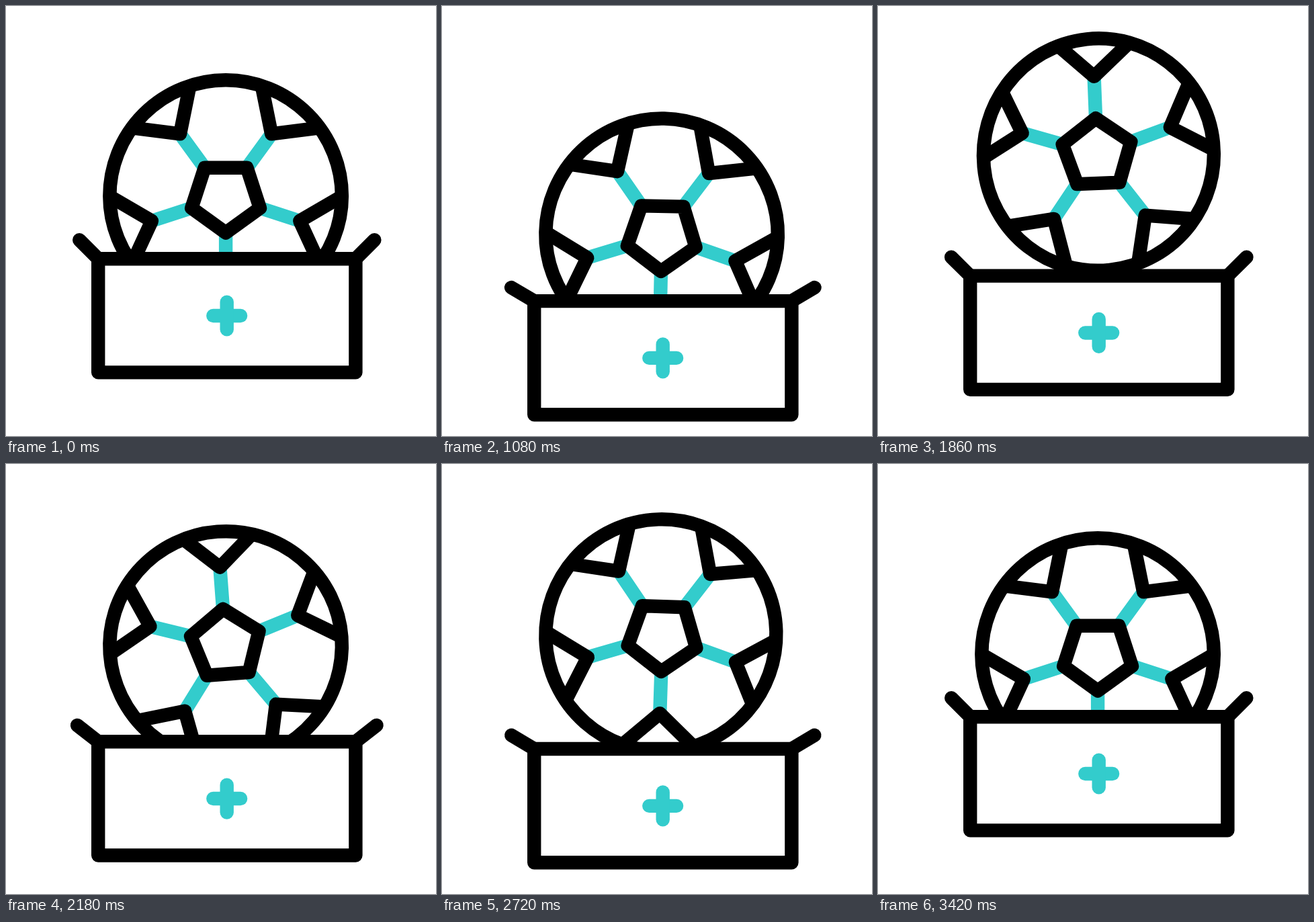
An HTML page with a canvas that plays this animation: 640 px wide and 640 px high, repeating every 3.62 s.

```html
<!DOCTYPE html>
<html lang="en">
<head>
<meta charset="utf-8">
<title>Ball in a box</title>
<style>
  html, body { margin: 0; width: 100%; height: 100%; overflow: hidden; background: #fff; }
  canvas { display: block; width: 640px; height: 640px; }
</style>
</head>
<body>
<canvas id="stage" width="640" height="640"></canvas>
<script>
const ctx = document.getElementById('stage').getContext('2d');
const LOOP = 3620;
const BLACK = '#000', TEAL = '#33cccc';
const RAD = Math.PI / 180;

// Tracks are [time in ms, value] pairs, eased between neighbours.
const boxDrop = [[200, 0], [1000, 64], [1800, 25], [2600, 51], [3400, 0]];
const flapAngle = [[200, 45], [1000, 30], [1800, 45], [2600, 30], [3400, 45]];
const ballDrop = [[200, 0], [1000, 64], [1625, -84], [2300, -6.5], [2940, -36], [3400, 0]];
const ballSpin = [[1000, 0], [3400, 360]];

const ease = u => u * u * (3 - 2 * u);

function valueAt(track, t) {
  if (t <= track[0][0]) return track[0][1];
  for (let i = 1; i < track.length; i++) {
    const [t0, v0] = track[i - 1], [t1, v1] = track[i];
    if (t < t1) return v0 + (v1 - v0) * ease((t - t0) / (t1 - t0));
  }
  return track[track.length - 1][1];
}

const polar = (radius, degrees, dy = 0) =>
  [radius * Math.cos(degrees * RAD), radius * Math.sin(degrees * RAD) + dy];

function line(points, color = BLACK, closed = false) {
  ctx.beginPath();
  points.forEach(p => ctx.lineTo(...p));
  if (closed) ctx.closePath();
  ctx.strokeStyle = color;
  ctx.stroke();
}

function drawBall(t) {
  const R = 172.8;
  const spokes = [18, 90, 162, 234, 306];
  const corner = a => polar(53.5, a, 1);
  const tip = a => polar(115.8, a, 1);

  ctx.save();
  ctx.translate(327.1, 283.1 + valueAt(ballDrop, t));
  ctx.rotate(valueAt(ballSpin, t) * RAD);

  spokes.forEach(a => line([corner(a), tip(a)], TEAL));
  line(spokes.map(corner), BLACK, true);
  spokes.forEach(a => line([polar(169, a - 17.2), tip(a), polar(169, a + 17.2)]));

  // The underside is slightly flatter than the top.
  ctx.beginPath();
  ctx.arc(0, 0, R, Math.PI, 2 * Math.PI);
  ctx.ellipse(0, 0, R, R - 2.8, 0, 0, Math.PI);
  ctx.closePath();
  ctx.stroke();
  ctx.restore();
}

function drawBox(t) {
  const left = 137.2, right = 520.4, top = 376.2, bottom = 545.4;
  const plusX = 328.7, plusY = 461, arm = 20.4;
  const [dx, dy] = polar(39.6, valueAt(flapAngle, t));

  ctx.save();
  ctx.translate(0, valueAt(boxDrop, t));
  ctx.fillStyle = '#fff';
  ctx.fillRect(left, top, right - left, bottom - top);
  line([[left, top], [right, top], [right, bottom], [left, bottom]], BLACK, true);
  line([[left, top], [left - dx, top - dy]]);
  line([[right, top], [right + dx, top - dy]]);
  line([[plusX - arm, plusY], [plusX + arm, plusY]], TEAL);
  line([[plusX, plusY - arm], [plusX, plusY + arm]], TEAL);
  ctx.restore();
}

function draw() {
  const t = performance.now() % LOOP;
  ctx.fillStyle = '#fff';
  ctx.fillRect(0, 0, 640, 640);
  ctx.lineWidth = 20.4;
  ctx.lineCap = ctx.lineJoin = 'round';
  drawBall(t);
  drawBox(t);
  requestAnimationFrame(draw);
}
draw();
</script>
</body>
</html>
```
